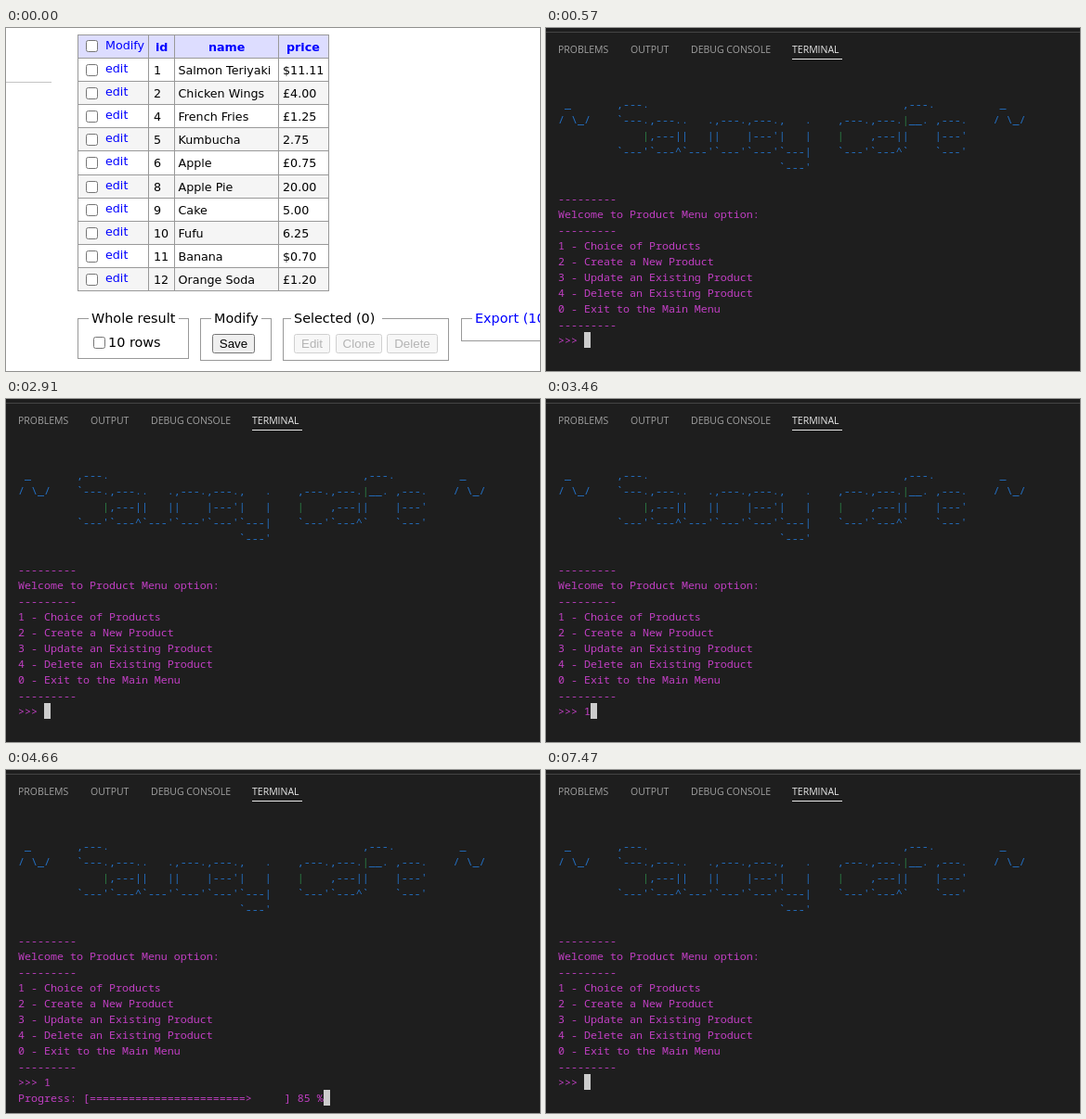
Write an HTML page that moves like this. It is 575 px wide and 370 px high and loops after 8 s.

```html
<!DOCTYPE html>
<html lang="en">
<head>
<meta charset="utf-8">
<style>
  html, body { margin: 0; width: 100%; height: 100%; overflow: hidden; }
  #page, #terminal { position: absolute; left: 0; top: 0; width: 575px; height: 370px; overflow: hidden; }
  #page { background: #fff; font: 12.7px "DejaVu Sans", sans-serif; }
  .button { font: 13.33px "Liberation Sans", sans-serif; }
  .legend { font-size: 14.4px; }
  #terminal { background: #1e1e1e; }
  #terminal * { position: absolute; }
  #edge { top: 4px; width: 100%; height: 1px; background: #444; }
  .tab { top: 15px; font: 10.5px/17px "Open Sans", sans-serif; color: #a0a0a0; white-space: nowrap; }
  .tab.active { color: #e7e7e7; }
  #underline { left: 265px; top: 33px; width: 54px; height: 1px; background: #e7e7e7; }
  #terminal pre { left: 13px; top: 56px; margin: 0; font: 11.667px/17px "Noto Sans Mono", monospace; color: #c23fc4; }
  #terminal pre span { position: static; }
  .art { color: #2472c8; }
  .green { color: #2c7f45; }
  .red { color: #c92c48; }
  .purple { color: #8436dc; }
  #cursor { width: 7px; height: 17px; box-sizing: border-box; border: 1px solid #ccc; }
  #pointer { left: 275px; top: 344px; }
</style>
</head>
<body>
<svg id="page" viewBox="0 0 575 370"></svg>
<div id="terminal">
  <div id="edge"></div>
  <div class="tab" style="left:13px">PROBLEMS</div>
  <div class="tab" style="left:91px">OUTPUT</div>
  <div class="tab" style="left:156px">DEBUG CONSOLE</div>
  <div class="tab active" style="left:265px">TERMINAL</div>
  <div id="underline"></div>
  <pre id="screen"></pre>
  <div id="cursor"></div>
  <svg id="pointer" width="7" height="15"><path d="M0 .5h3M4 .5h3M3.5 1v13M0 14.5h3M4 14.5h3" stroke="#eee" fill="none"/></svg>
</div>
<script>
const LOOP = 8000;
const $ = id => document.getElementById(id);

const products = [
  ['1', 'Salmon Teriyaki', '$11.11'],
  ['2', 'Chicken Wings', '£4.00'],
  ['4', 'French Fries', '£1.25'],
  ['5', 'Kumbucha ', '2.75'],
  ['6', 'Apple', '£0.75'],
  ['8', 'Apple Pie', '20.00'],
  ['9', 'Cake', '5.00'],
  ['10', 'Fufu', '6.25'],
  ['11', 'Banana', '$0.70'],
  ['12', 'Orange Soda', '£1.20']
];

// Web page
const rect = (x, y, w, h, fill, stroke = 'none', radius = 0) =>
  `<rect x="${x + .5}" y="${y + .5}" width="${w - 1}" height="${h - 1}" rx="${radius}" fill="${fill}" stroke="${stroke}"/>`;
const text = (x, y, content, fill = '#000', attrs = '') =>
  `<text x="${x}" y="${y}" fill="${fill}" ${attrs}>${content}</text>`;
const checkbox = (x, y) => rect(x, y, 13, 13, '#fff', '#767676', 2);
const fieldset = (x, w, h, label, labelX, labelW, fill) =>
  rect(x, 313, w, h, 'none', '#999') + rect(labelX - 3, 312, labelW + 6, 4, '#fff', '#fff') +
  text(labelX, 318, label, fill, 'class="legend"');
const button = (x, w, label, enabled) =>
  rect(x, 330, w, 21, enabled ? '#efefef' : '#f7f7f7', enabled ? '#767676' : '#d0d0d0', 2) +
  text(x + w / 2, 345, label, enabled ? '#000' : '#b4b4b4', 'class="button" text-anchor="middle"');

function drawPage() {
  const link = '#00f', bold = 'font-weight="bold"';
  const rowLine = i => Math.round(32 + 25.1 * i);
  let out = `<path d="M0 58.5H49" stroke="#c4c4c4"/>` + rect(77, 7, 271, 26, '#ddf');
  let lines = 'M77 7.5H348';
  products.forEach(([id, name, price], i) => {
    const top = rowLine(i);
    if (i % 2) out += `<rect x="77" y="${top}" width="271" height="25" fill="#f5f5f5"/>`;
    out += checkbox(86, top + 7) + text(107, top + 16, 'edit', link) +
      text(159, top + 18, id) + text(185.5, top + 18, name) + text(298, top + 18, price);
  });
  for (let i = 0; i <= products.length; i++) lines += `M77 ${rowLine(i) + .5}H348`;
  for (const x of [77, 153, 181, 293, 347]) lines += `M${x + .5} 7V284`;
  out += `<path d="${lines}" stroke="#999" fill="none"/>` + checkbox(86, 13) +
    text(107, 23, 'Modify', link) + text(161, 25, 'id', link, bold) +
    text(218, 25, 'name', link, bold) + text(302, 25, 'price', link, bold);

  out += fieldset(77, 120, 44, 'Whole result', 92, 91) + checkbox(94, 333) +
    text(110, 344, '10 rows', '#000', 'class="legend"');
  out += fieldset(209, 77, 46, 'Modify', 224, 48) + button(222, 46, 'Save', true);
  out += fieldset(298, 179, 46, 'Selected (0)', 310, 92) + button(310, 39, 'Edit') +
    button(355, 50, 'Clone') + button(410, 55, 'Delete');
  out += fieldset(490, 120, 25, 'Export (10)', 505, 80, link);
  $('page').innerHTML = out;
}

// Terminal screens; ¦ marks a differently tinted bar
const span = (name, s) => `<span class="${name}">${s}</span>`;
const art = String.raw`
 _       ,---.                                       ,---.          _
/ \_/    ${'`'}---.,---..   .,---.,---.,   .    ,---.,---.¦__. ,---.    / \_/
             ¦,---||   ||    |---'|   |    ¦    ,---||    |---'
         ${'`'}---'${'`'}---^${'`'}---'${'`'}---'${'`'}---'${'`'}---|    ${'`'}---'${'`'}---^${'`'}    ${'`'}---'
                                  ${'`'}---'`.replaceAll('¦', span('green', '|'));
const rule = '---------';
const menu = '\n' + span('art', art.slice(1)) + '\n\n' + [
  rule, 'Welcome to Product Menu option:', rule,
  '1 - Choice of Products', '2 - Create a New Product',
  '3 - Update an Existing Product', '4 - Delete an Existing Product',
  '0 - Exit to the Main Menu', rule, '>>> '
].join('\n');

function center(s, width) {
  const excess = width - s.length;
  const left = excess % 2 && s.length % 2 === 0 ? Math.ceil(excess / 2) : Math.floor(excess / 2);
  return ' '.repeat(left) + s + ' '.repeat(excess - left);
}
const tableRow = ([id, name, price]) =>
  `| ${id.padEnd(2)} ¦ ${center(name, 15)} ¦ ${center(price, 6)} |`
    .replaceAll('|', span('purple', '|')).replaceAll('¦', span('red', '|'));
const border = '+' + [4, 17, 8].map(n => '-'.repeat(n) + '+').join('');
const table = [border, tableRow(['id', 'name', 'price']), border,
  ...products.map(tableRow), border, '>>>: '].join('\n');

function progress(percent) {
  const filled = Math.floor(percent * 30 / 100);
  const bar = ('='.repeat(filled - 1) + '>').padEnd(30);
  return `\nProgress: [${bar}] ${percent} %`;
}

// Returns screen content and the cursor cell
function terminalAt(t) {
  if (t >= 7470 || t < 3460) return [menu, 4, 16];
  if (t >= 4780) return [table, 5, 14];
  if (t < 4400) return [menu + '1', 5, 16];
  return [menu + '1' + progress(t < 4540 ? 25 : t < 4660 ? 55 : 85), 47, 17];
}

let shown;
function render(now) {
  const t = now % LOOP;
  $('terminal').style.display = t < 450 ? 'none' : 'block';
  const [content, column, row] = terminalAt(t);
  if (content !== shown) $('screen').innerHTML = shown = content;

  const cursor = $('cursor').style;
  cursor.left = 13 + 7 * column + 'px';
  cursor.top = 56 + 17 * row + 'px';
  cursor.background = t < 570 ? 'none' : '#ccc';

  const pointer = $('pointer').style;
  pointer.display = t >= 2120 && t < 2910 ? 'block' : 'none';
  pointer.top = (t < 2240 ? 344 : t < 2370 ? 335 : 327) + 'px';
  requestAnimationFrame(render);
}

drawPage();
render(0);
</script>
</body>
</html>
```
